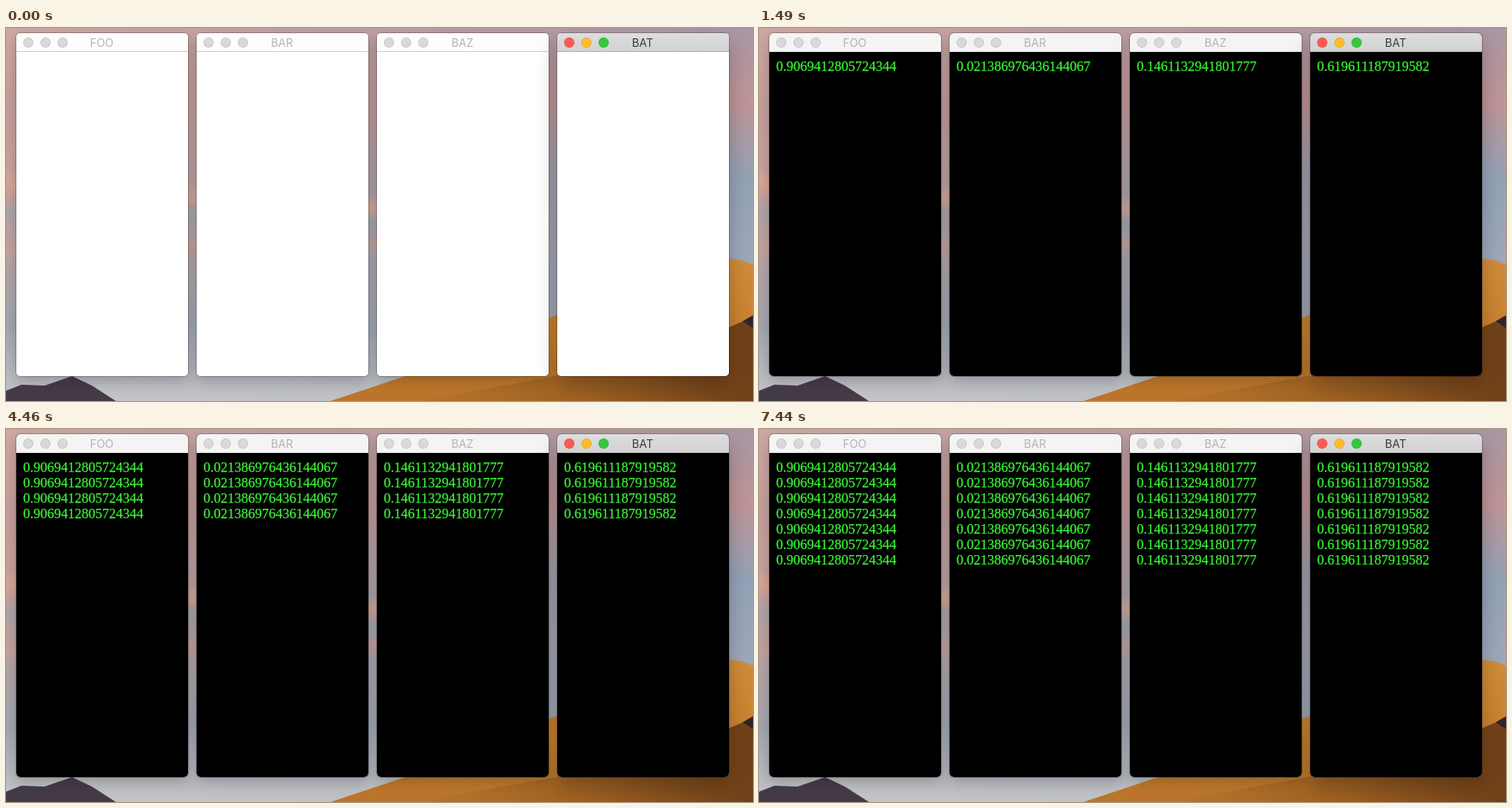
An HTML page with a canvas that plays this animation: 870x435 px, repeating every 8 s.

```html
<!DOCTYPE html>
<html lang="en">
<head>
<meta charset="utf-8">
<title>Four windows</title>
<style>
  html, body { margin: 0; width: 100%; height: 100%; overflow: hidden; }
  canvas { display: block; width: 870px; height: 435px; }
</style>
</head>
<body>
<canvas id="stage" width="870" height="435"></canvas>
<script>
const W = 870, H = 435, LOOP = 8000;
const ctx = document.getElementById('stage').getContext('2d');

const WIN = { left: 12, pitch: 210, top: 6, width: 200, height: 400, bar: 22, radius: 5 };
const LIGHTS = ['#fc5b53', '#fdbc2f', '#36c83c'];
const windows = [
  { title: 'FOO', value: '0.9069412805724344' },
  { title: 'BAR', value: '0.021386976436144067' },
  { title: 'BAZ', value: '0.1461132941801777' },
  { title: 'BAT', value: '0.619611187919582' }
].map((win, i) => ({ ...win, i, x: WIN.left + WIN.pitch * i }));

// Every window prints at a steady period; the screen refreshes once per TICK.
const TICK = 148.2;
const PRINT = { first: 7.1, lag: 0.945, period: 6.62 };
const loadTick = i => i + 1;
const printTick = (i, row) => Math.ceil(PRINT.first + PRINT.lag * i + PRINT.period * row);

function gradient(g, x0, y0, x1, y1, colors) {
  const fill = g.createLinearGradient(x0, y0, x1, y1);
  colors.forEach((color, i) => fill.addColorStop(i / (colors.length - 1), color));
  return fill;
}

function paintSky(g) {
  const warm = gradient(g, 0, 0, 0, H,
    ['#cfa8a3', '#c59f9c', '#c8a19d', '#b9a3a4', '#a1a7b1', '#c5c6c8']);
  const cool = gradient(g, 0, 0, 0, H,
    ['#a896a5', '#bf9598', '#93a2b7', '#9ca8ba', '#a0a9b8', '#bcbdc1']);
  g.fillStyle = warm;
  g.fillRect(0, 0, W, H);
  g.fillStyle = cool;
  for (let x = 0; x < W; x++) {
    g.globalAlpha = x / W;
    g.fillRect(x, 0, 1, H);
  }
  g.globalAlpha = 1;
}

function paintCloud(g, y0, y1, width, color) {
  g.save();
  g.filter = 'blur(5px)';
  g.globalAlpha = 0.7;
  g.strokeStyle = color;
  g.lineWidth = width;
  g.beginPath();
  g.moveTo(-20, y0);
  g.lineTo(450, y1);
  g.stroke();
  g.restore();
}

function polygon(g, points, fill) {
  g.beginPath();
  points.forEach(([x, y]) => g.lineTo(x, y));
  g.closePath();
  g.fillStyle = fill;
  g.fill();
}

function paintLand(g) {
  polygon(g, [[0, 423], [18, 416], [45, 417], [77, 406], [100, 417], [128, 435], [0, 435]], '#453b48');
  polygon(g, [[378, 435], [468, 405], [640, 335], [740, 285], [842, 269], [858, 271], [870, 276], [870, 435]],
    gradient(g, 0, 268, 0, H, ['#d08c3b', '#c9822f', '#b9742a']));
  polygon(g, [[480, 435], [700, 395], [842, 349], [870, 337], [870, 435]],
    gradient(g, 480, 0, W, 0, ['#b8742b', '#a06223', '#6f4019']));
  polygon(g, [[858, 342], [870, 335], [870, 350]], '#30252a');
}

function makeDesktop() {
  const layer = document.createElement('canvas');
  layer.width = W;
  layer.height = H;
  const g = layer.getContext('2d');
  paintSky(g);
  paintCloud(g, 178, 212, 18, '#dfa893');
  paintCloud(g, 214, 232, 18, '#a3a7b1');
  paintCloud(g, 258, 252, 14, '#d0a197');
  paintLand(g);
  return layer;
}
const desktop = makeDesktop();

function frame(x, grow = 0) {
  ctx.beginPath();
  ctx.roundRect(x - grow, WIN.top - grow, WIN.width + 2 * grow, WIN.height + 2 * grow, WIN.radius + grow);
}

function castShadow({ x }, active) {
  ctx.save();
  ctx.shadowColor = active ? 'rgba(0,0,0,.25)' : 'rgba(0,0,0,.2)';
  ctx.shadowBlur = active ? 24 : 16;
  ctx.shadowOffsetY = active ? 12 : 6;
  ctx.fillStyle = '#fff';
  frame(x);
  ctx.fill();
  ctx.restore();
}

function disc(x, y, r) {
  ctx.beginPath();
  ctx.arc(x, y, r, 0, Math.PI * 2);
}

function drawBar(x, title, active, loaded) {
  const { top, width, bar } = WIN;
  ctx.fillStyle = active
    ? gradient(ctx, 0, top, 0, top + bar, ['#dedede', '#d7d7d7', '#d2d2d2'])
    : loaded ? '#f4f4f4' : '#fdfdfd';
  ctx.fillRect(x, top, width, bar);
  ctx.fillStyle = active ? '#b4b4b4' : loaded ? '#dedede' : '#d0d0d0';
  ctx.fillRect(x, top + bar - 1, width, 1);

  LIGHTS.forEach((color, i) => {
    const cx = x + 14 + 20 * i;
    disc(cx, 17, 6);
    ctx.fillStyle = active ? color : '#d9d9d9';
    ctx.fill();
    disc(cx, 17, 5.5);
    ctx.lineWidth = 1;
    ctx.strokeStyle = 'rgba(0,0,0,.08)';
    ctx.stroke();
  });

  ctx.font = '13px Inter, sans-serif';
  ctx.textAlign = 'center';
  ctx.fillStyle = active ? '#3c3c3c' : '#b3b3b3';
  ctx.fillText(title, x + 99.5, 22);
}

function drawLines({ x, i, value }, tick) {
  ctx.font = '16px "Liberation Serif", serif';
  ctx.textAlign = 'left';
  ctx.fillStyle = ctx.strokeStyle = '#3af235';
  ctx.lineWidth = 0.25;
  for (let row = 0; tick >= printTick(i, row); row++) {
    const y = 50 + 18 * row;
    ctx.fillText(value, x + 8, y);
    ctx.strokeText(value, x + 8, y);
  }
}

function drawWindow(win, tick, active) {
  const { x, i, title } = win;
  const loaded = tick >= loadTick(i);
  ctx.save();
  frame(x, 0.5);
  ctx.strokeStyle = 'rgba(0,0,0,.2)';
  ctx.lineWidth = 1;
  ctx.stroke();
  frame(x);
  ctx.clip();
  ctx.fillStyle = loaded ? '#000' : '#fff';
  ctx.fillRect(x, WIN.top, WIN.width, WIN.height);
  drawBar(x, title, active, loaded);
  drawLines(win, tick);
  ctx.restore();
}

function draw(t) {
  const tick = Math.floor(t / TICK);
  const last = windows.length - 1;
  const focused = windows[tick === 0 ? last : Math.min(last, tick - 1)];
  const others = windows.filter(win => win !== focused);
  ctx.drawImage(desktop, 0, 0);
  others.forEach(win => castShadow(win, false));
  others.forEach(win => drawWindow(win, tick, false));
  castShadow(focused, true);
  drawWindow(focused, tick, true);
}

const begin = performance.now();
function animate() {
  draw((performance.now() - begin) % LOOP);
  requestAnimationFrame(animate);
}
animate();
</script>
</body>
</html>
```
